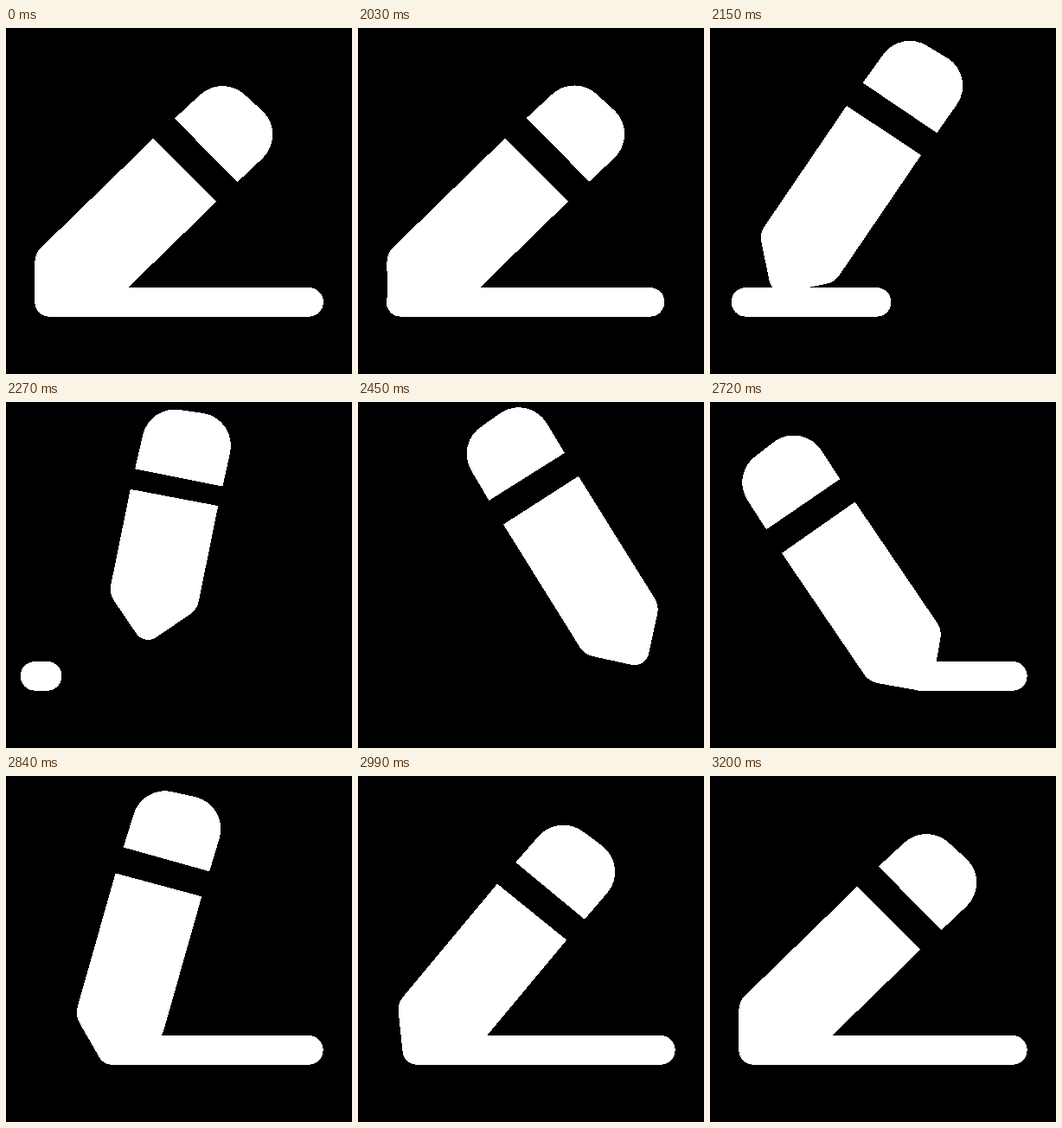
An HTML page that plays this animation: 400x400 px, repeating every 3230 ms.

```html
<!DOCTYPE html>
<html lang="en">
<head>
<meta charset="utf-8">
<title>Pencil</title>
<style>
  html, body { margin: 0; width: 100%; height: 100%; overflow: hidden; background: #000; }
  svg { display: block; width: 100vw; height: 100vh; }
</style>
</head>
<body>
<svg viewBox="0 0 400 400" fill="#fff" shape-rendering="crispEdges">
  <rect id="bar" y="300" height="33.7" rx="16.85"/>
  <g id="pencil">
    <path id="body"/>
    <path id="cap" d="M195 104.5 L267.3 178.3 L296.8 150.5 A38 38 0 0 0 297.5 96.8 L277.5 78.5 A38 38 0 0 0 223.8 77.8 Z"/>
  </g>
</svg>
<script>
const LOOP = 3230, STEP = 30, FIRST = 2030;
const LIFT = [2020, 2510], ERASE = [2000, 2300], WRITE = [2570, 3200];
const R = 16.67, LEFT = 50, RIGHT = 350, BASE = 316.67, TURN = -90;
const AXIS = [-0.718, 0.696];

const $ = id => document.getElementById(id);
const bar = $('bar'), pencil = $('pencil'), body = $('body'), cap = $('cap');
const mix = (a, b, k) => a + (b - a) * k;
const span = (t, [a, b]) => Math.min(1, Math.max(0, (t - a) / (b - a)));
const hump = k => Math.sin(Math.PI * k) ** 2;

// Cubic bezier easing with control points (x1, 0) and (x2, 1)
const bezier = (x1, x2) => u => {
  let lo = 0, hi = 1, s = u;
  for (let i = 0; i < 24; i++) {
    s = (lo + hi) / 2;
    const x = 3 * (1 - s) * s * ((1 - s) * x1 + s * x2) + s ** 3;
    if (x < u) lo = s; else hi = s;
  }
  return u <= 0 ? 0 : u >= 1 ? 1 : s * s * (3 - 2 * s);
};
const fly = bezier(0.42, 0.84);
const lean = bezier(0.36, 0.925);
const shrink = bezier(0.25, 0.75);
const slide = bezier(0.33, 0.1);
const swing = bezier(0.56, 0.1);

function setBar(x0, x1) {
  bar.setAttribute('x', x0);
  bar.setAttribute('width', Math.max(0, x1 - x0));
}

// x, y: centre of the rounded tip; short: how far the shaft is shortened
function setPencil(x, y, angle, short) {
  const [dx, dy] = AXIS.map(c => c * short);
  body.setAttribute('d',
    `M${170 + dx} ${128 + dy} L${243 + dx} ${201 + dy} L114.2 326.3 Q107 333.33 97 333.33
     H50 A${R} ${R} 0 0 1 33.33 ${BASE} V271 Q33.33 261 40.4 254 Z`);
  cap.setAttribute('transform', `translate(${dx * 1.15} ${dy * 1.15})`);
  pencil.setAttribute('transform',
    `translate(${x} ${y}) rotate(${angle}) translate(${-LEFT} ${-BASE})`);
}

function draw(time) {
  const t = time < FIRST ? 0 : FIRST + Math.floor((time - FIRST) / STEP) * STEP;
  if (t <= WRITE[0]) {
    const u = span(t, LIFT), q = lean(u), e = shrink(span(t, ERASE));
    setPencil(mix(LEFT, RIGHT, fly(u)), BASE - 248 * q * (1 - q), TURN * q, 78 * hump(q));
    if (t <= ERASE[1]) setBar(mix(33.33, 16, e), mix(366.9, 52, e));
    else setBar(0, 0);
  } else {
    const u = span(t, WRITE), x = mix(RIGHT, LEFT, slide(u));
    setPencil(x, BASE, TURN * (1 - swing(u)), 20 * hump(Math.min(1, u / 0.9)));
    setBar(x - R, RIGHT + R);
  }
}

const start = performance.now();
function tick() {
  draw((performance.now() - start) % LOOP);
  requestAnimationFrame(tick);
}
tick();
</script>
</body>
</html>
```
